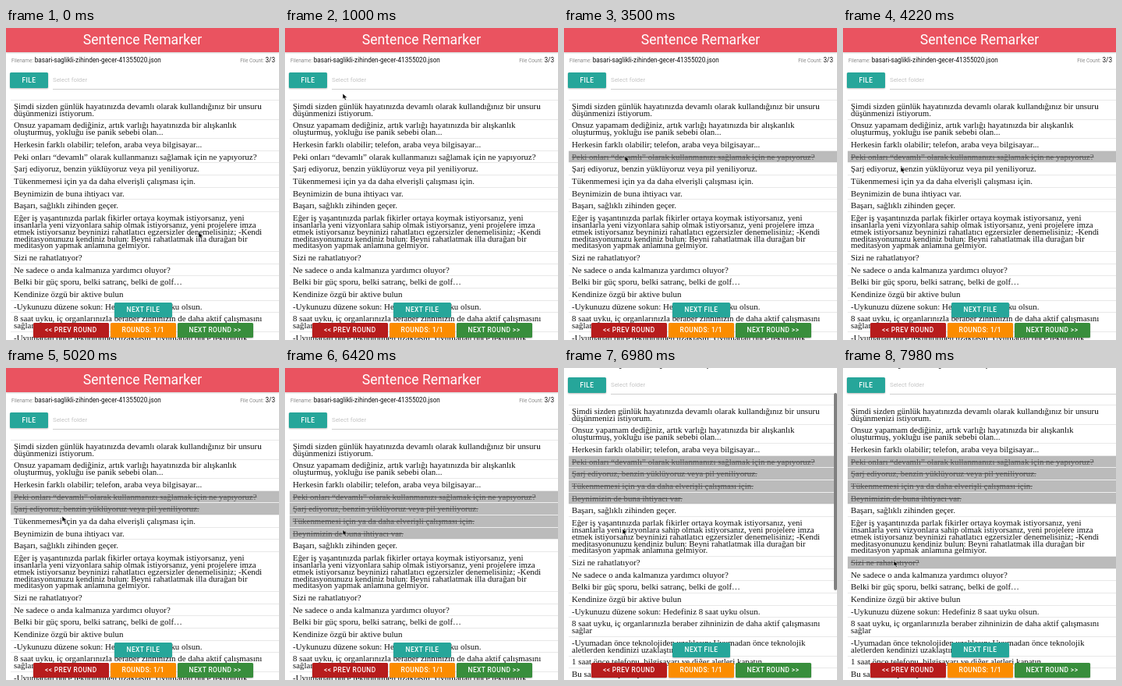
Animation, 350 px wide and 400 px high, one loop 8 s. Source, as an HTML page:

```html
<!DOCTYPE html>
<html lang="tr">
<head>
<meta charset="utf-8">
<title>Sentence Remarker</title>
<style>
  html, body { margin: 0; width: 100%; height: 100%; overflow: hidden; background: #fff; }
  #stage { position: relative; width: 350px; height: 400px; overflow: hidden; font-family: Roboto, sans-serif; }
  .scroll { position: absolute; inset: 0; animation: scroll 8s linear infinite; }
  .at {
    position: absolute; white-space: nowrap;
    left: calc(var(--x) * 1px); top: calc(var(--y) * 1px);
    width: calc(var(--w) * 1px); height: calc(var(--h) * 1px);
    line-height: calc(var(--h) * 1px);
  }
  nav { background: #ea5360; color: #fff; font-size: 17.6px; text-align: center; box-shadow: 0 1px 2px #0003; }
  .info { font-size: 6.5px; color: #8a8a8a; }
  .info b { font-size: 8.2px; font-weight: 400; color: #111; }
  .right { text-align: right; }
  .btn {
    color: #fff; font-size: 8.4px; font-weight: 500; letter-spacing: .4px;
    text-align: center; border-radius: 1.5px; box-shadow: 0 1px 2px #0004;
  }
  .teal { background: #26a69a; }
  .field { font-size: 7.9px; color: #c4c4c4; border-bottom: 1px solid #cfcfcf; }
  ul {
    position: absolute; left: 6px; top: 92px; width: 344px; margin: 0; padding: 0;
    list-style: none; border-top: 1px solid #e8e8e8;
    font: 10.9px/8.9px "Liberation Serif", serif; color: #111;
  }
  li {
    --on: 0; padding: 2.9px 4px 2.85px; border-bottom: 1px solid #e8e8e8; white-space: nowrap;
    background: rgb(159 159 159 / var(--on)); opacity: calc(1 - .3 * var(--on));
    text-decoration: line-through 1px rgb(17 17 17 / var(--on));
  }
  .m1 { animation: m1 8s step-end infinite; }
  .m2 { animation: m2 8s step-end infinite; }
  .m3 { animation: m3 8s step-end infinite; }
  .m4 { animation: m4 8s step-end infinite; }
  .m5 { animation: m5 8s step-end infinite; }
  @keyframes m1 { 0% { --on: 0 } 37.5%, 100% { --on: 1 } }
  @keyframes m2 { 0% { --on: 0 } 53.75%, 100% { --on: 1 } }
  @keyframes m3 { 0% { --on: 0 } 66.25%, 100% { --on: 1 } }
  @keyframes m4 { 0% { --on: 0 } 74.4%, 100% { --on: 1 } }
  @keyframes m5 { 0% { --on: 0 } 95.6%, 100% { --on: 1 } }
  @keyframes scroll {
    0%, 83.5% { transform: translateY(0) }
    84.25% { transform: translateY(-17px) }
    86.75%, 100% { transform: translateY(-45px) }
  }
  .thumb {
    position: absolute; left: 346px; top: 3px; width: 3.5px; height: 253px;
    border-radius: 2px; background: #808080; animation: thumb 8s linear infinite;
  }
  @keyframes thumb {
    0%, 83.5% { transform: translateY(0); opacity: 0 }
    83.6% { opacity: 1 }
    84.25% { transform: translateY(11px) }
    86.75% { transform: translateY(29px) }
    92% { opacity: 1 }
    95%, 100% { transform: translateY(29px); opacity: 0 }
  }
  .cursor {
    position: absolute; left: 0; top: 0; width: 8px; height: 10px; overflow: visible;
    animation: point 8s ease-in-out infinite;
  }
  @keyframes point {
    0% { transform: translate(247px, 262px) }
    10.25% { transform: translate(76px, 86px) }
    12.5%, 20.75% { transform: translate(74px, 84px) }
    35%, 44.5% { transform: translate(78px, 164px) }
    52%, 57% { transform: translate(74px, 178px) }
    62.75% { transform: translate(72px, 190px) }
    65%, 68% { transform: translate(72px, 195px) }
    73% { transform: translate(74px, 208px) }
    84.25% { transform: translate(74px, 207px) }
    87.25% { transform: translate(75px, 206px) }
    94%, 100% { transform: translate(65px, 247px) }
  }
</style>
</head>
<body>
<div id="stage">
  <div class="scroll">
    <nav class="at" style="--x:0;--y:0;--w:350;--h:31">Sentence Remarker</nav>
    <div class="at info" style="--x:7;--y:36;--w:220;--h:10">Filename: <b>basari-saglikli-zihinden-gecer-41355020.json</b></div>
    <div class="at info right" style="--x:245;--y:36;--w:100;--h:10">File Count: <b>3/3</b></div>
    <div class="at btn teal" style="--x:5;--y:56.5;--w:49;--h:20.5">FILE</div>
    <div class="at field" style="--x:60;--y:56;--w:290;--h:22">Select folder</div>
    <ul>
      <li>Şimdi sizden günlük hayatınızda devamlı olarak kullandığınız bir unsuru<br>düşünmenizi istiyorum.</li>
      <li>Onsuz yapamam dediğiniz, artık varlığı hayatınızda bir alışkanlık<br>oluşturmuş, yokluğu ise panik sebebi olan...</li>
      <li>Herkesin farklı olabilir; telefon, araba veya bilgisayar...</li>
      <li class="m1">Peki onları “devamlı” olarak kullanmanızı sağlamak için ne yapıyoruz?</li>
      <li class="m2">Şarj ediyoruz, benzin yüklüyoruz veya pil yeniliyoruz.</li>
      <li class="m3">Tükenmemesi için ya da daha elverişli çalışması için.</li>
      <li class="m4">Beynimizin de buna ihtiyacı var.</li>
      <li>Başarı, sağlıklı zihinden geçer.</li>
      <li>Eğer iş yaşantınızda parlak fikirler ortaya koymak istiyorsanız, yeni<br>insanlarla yeni vizyonlara sahip olmak istiyorsanız, yeni projelere imza<br>etmek istiyorsanız beyninizi rahatlatıcı egzersizler denemelisiniz; -Kendi<br>meditasyonunuzu kendiniz bulun: Beyni rahatlatmak illa durağan bir<br>meditasyon yapmak anlamına gelmiyor.</li>
      <li class="m5">Sizi ne rahatlatıyor?</li>
      <li>Ne sadece o anda kalmanıza yardımcı oluyor?</li>
      <li>Belki bir güç sporu, belki satranç, belki de golf…</li>
      <li>Kendinize özgü bir aktive bulun</li>
      <li>-Uykunuzu düzene sokun: Hedefiniz 8 saat uyku olsun.</li>
      <li>8 saat uyku, iç organlarınızla beraber zihninizin de daha aktif çalışmasını<br>sağlar</li>
      <li>-Uyumadan önce teknolojiden uzaklaşın: Uyumadan önce teknolojik<br>aletlerden kendinizi uzaklaştırın.</li>
      <li>1 saat önce telefonu, bilgisayarı ve diğer aletleri kapatın.</li>
      <li>Bu saatte kitap okuyun.</li>
    </ul>
  </div>
  <div class="at btn teal" style="--x:139;--y:352;--w:74;--h:19">NEXT FILE</div>
  <div class="at btn" style="--x:35;--y:378;--w:96.5;--h:18.5;background:#b71c1c">&lt;&lt; PREV ROUND</div>
  <div class="at btn" style="--x:133.5;--y:378;--w:84.5;--h:18.5;background:#fb8c00">ROUNDS: 1/1</div>
  <div class="at btn" style="--x:219.5;--y:378;--w:97;--h:18.5;background:#388e3c">NEXT ROUND &gt;&gt;</div>
  <div class="thumb"></div>
  <svg class="cursor" viewBox="0 0 8 10"><path d="M0 0V7L1.8 5.7 3 8.5 4.4 8 3.3 5.2H5.8Z" fill="#000" stroke="#fff" stroke-width=".6"/></svg>
</div>
</body>
</html>
```
